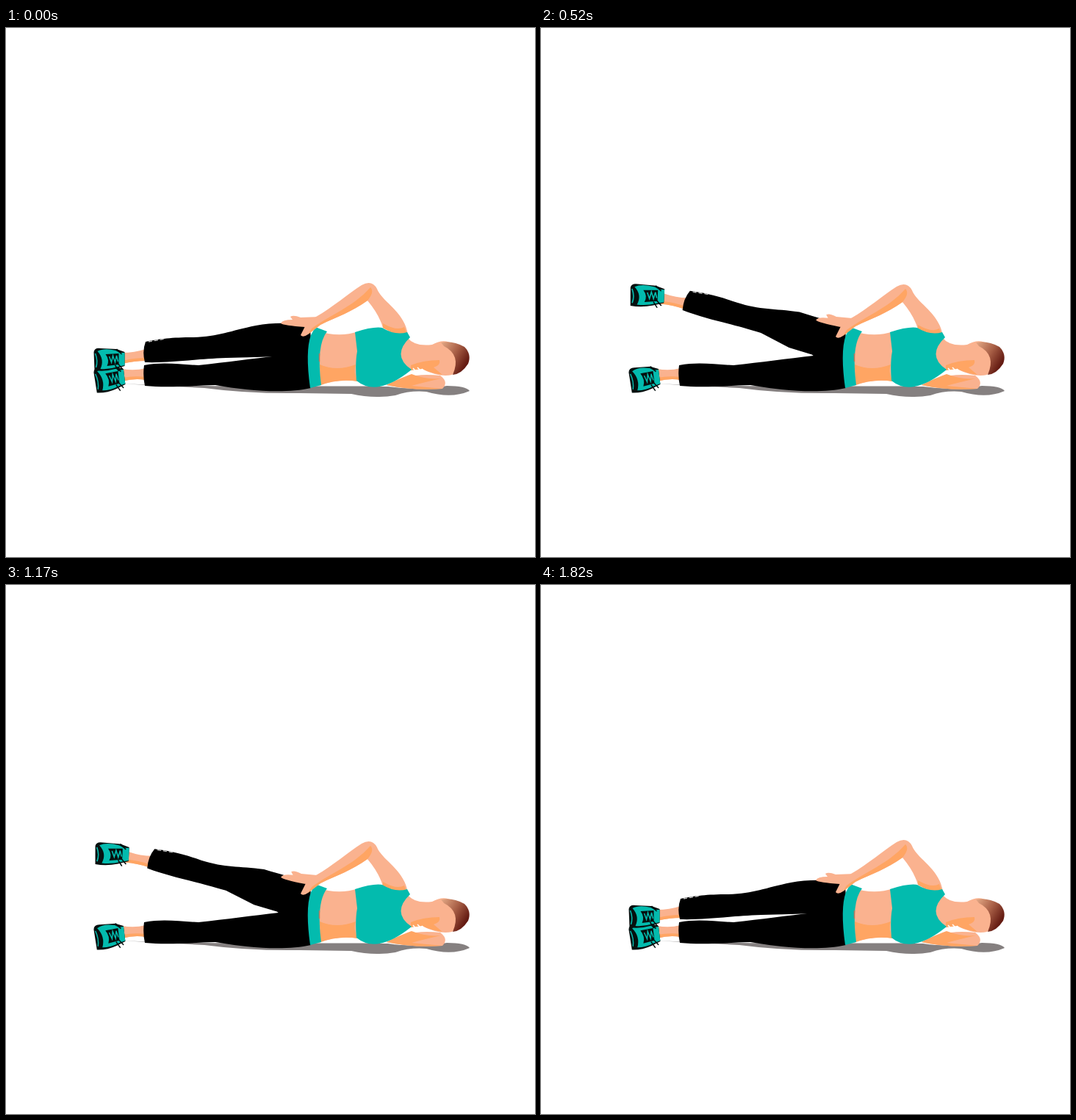
An HTML page that plays this animation: 720x720 px, repeating every 1950 ms.

```html
<!DOCTYPE html>
<html lang="en">
<head>
<meta charset="utf-8">
<title>Side leg raise</title>
<style>
html, body { margin: 0; width: 100%; height: 100%; overflow: hidden; background: #fff; }
svg { display: block; width: 100vw; height: 100vh; }
.skin { fill: #fab28f; }
.shade { fill: #ffa563; }
.teal { fill: #03bbae; }
.dark { fill: #06100f; }
.line { fill: none; stroke-width: 1.5; }
</style>
</head>
<body>
<svg viewBox="0 0 720 720">
  <defs>
    <linearGradient id="hair" x1="0" y1="0" x2="1" y2=".7">
      <stop offset="0" stop-color="#e6ab87"/><stop offset=".5" stop-color="#a75e45"/><stop offset=".9" stop-color="#651c13"/>
    </linearGradient>
    <g id="boot">
      <path class="dark" d="M-21 -10Q-20 -16 -12 -15L10 -14L21 -10V9L8 13Q-6 17 -20 15Z"/>
      <path class="teal" d="M-16 -11Q-7 -16 9 -12L14 -9L21 -9V8L12 10Q0 14 -12 13Q-6 0 -16 -11Z"/>
      <path class="dark" d="M-5 -7L13 -8V7L-3 9Q1 1 -5 -7Z"/>
      <path class="line" stroke="#03bbae" d="M-19 -8Q-15 2 -18 11M0 -4L3 4L5 -5L8 4L10 -5L12 3"/>
      <path class="line" stroke="#06100f" d="M10 -14L17 -7M8 8L13 16M12 6L18 13"/>
    </g>
  </defs>

  <path fill="#858080" d="M156 484C300 490 460 486 520 488Q560 494 600 487Q626 487 631 494Q606 505 572 495Q550 493 530 500Q500 505 470 498L400 497Q330 498 270 490Z"/>

  <g id="restingLeg">
    <path class="skin" d="M158 464Q175 467 190 463V479Q175 476 158 481Z"/>
    <path class="shade" d="M158 476Q175 473 190 475V479Q175 476 158 481Z"/>
    <use href="#boot" transform="translate(141 477.5) rotate(-7) scale(.97 1.12)"/>
    <path d="M188 459C215 454 235 458 262 459C300 455 335 450 371 446L395 430L414 410Q418 450 415 490C380 498 330 494 285 486C250 487 220 490 189 487Q186 473 188 459Z"/>
  </g>

  <g id="raisedLeg">
    <path class="skin" data-bend d="M158 442Q175 442 190 437V453Q175 453 158 457Z"/>
    <path class="shade" data-bend d="M158 453Q175 449 190 449V453Q175 453 158 457Z"/>
    <use href="#boot" id="foot"/>
    <path data-bend d="M414 407C390 400 365 401 340 405C305 412 290 420 255 421C225 421 210 423 190 427Q185 440 189 455C225 456 250 451 300 449L340 448L370 447L400 468L414 440Z"/>
    <path class="line" data-bend stroke="#bbb" stroke-dasharray="5 3" d="M194 427L216 423"/>
  </g>

  <g id="torso">
    <path class="skin" d="M424 412Q452 422 480 413V481Q452 477 426 487Z"/>
    <path class="shade" d="M427 458Q450 468 476 458Q472 468 479 481Q452 477 428 486Z"/>
    <path class="teal" d="M421 407L437 413Q422 432 429 486L414 490Q407 440 415 418Z"/>
    <path class="line" stroke="#b07a60" d="M426.5 443V454"/>
  </g>

  <g id="head">
    <path class="skin" d="M518 486Q548 468 591 473Q603 482 594 491Q555 494 518 486Z"/>
    <path class="shade" d="M518 486Q540 475 552 471Q572 479 592 477Q570 482 552 487L594 491Q555 494 518 486Z"/>
    <path class="skin" d="M546 421Q556 434 580 431Q596 422 608 430L619 448Q618 464 607 472Q590 476 566 464L530 466V440Z"/>
    <path class="shade" d="M551 459Q568 452 590 452Q592 459 582 462L594 472Q580 470 566 464L551 466Z"/>
    <path class="line" stroke="#fff" d="M554 463L561 471M560 462L568 470M566 464L574 470"/>
    <path fill="url(#hair)" d="M592 428Q608 425 624 434Q634 444 629 457Q620 471 608 472Q620 445 596 433Z"/>
  </g>

  <g id="arm">
    <path id="hand" class="skin" d="M428 393L401 394Q391 390 387 393L390 397Q376 397 374 402Q378 405 407 407L424 406Z"/>
    <path class="skin" d="M422 393C445 380 465 362 484 350Q498 342 505 355C512 373 542 385 547 417H530L513 408Q508 390 492 371C470 387 450 393 428 404L411 417Q404 422 401 418L408 404Z"/>
    <path class="shade" d="M416 409C442 390 472 380 496 353Q502 359 492 371C470 387 450 393 428 404L411 417Z"/>
    <path class="shade" d="M513 402Q532 413 542 407L546 417H530L513 408Z"/>
  </g>
  <path class="teal" d="M475 414Q500 406 512 408Q530 419 546 414L550 421Q524 446 552 465Q505 503 477 480Q475 456 478 440Z"/>
</svg>
<script>
const STEP = 130, STEPS = 15, TOP_STEP = 7;
const MAX_ANGLE = 28.6 * Math.PI / 180;
const HIP = { x: 400, y: 430 };

const byId = id => document.getElementById(id);
const bent = [...document.querySelectorAll("[data-bend]")]
  .map(el => ({ el, rest: el.getAttribute("d").replace(/V([\d.]+)/g, "L190 $1") }));

// Turns a point about the hip; the turn fades out close to the joint.
function bend(x, y, angle) {
  const dx = x - HIP.x, dy = y - HIP.y;
  const reach = Math.min(1, Math.max(0, (-dx - 0.7 * dy) / 75));
  const c = Math.cos(angle * reach), s = Math.sin(angle * reach);
  return [HIP.x + dx * c - dy * s, HIP.y + dx * s + dy * c];
}

// Quick rise, then a softer landing
function liftAt(step) {
  const wave = Math.sin(Math.PI * step / (2 * TOP_STEP)) ** 2;
  return wave ** (step <= TOP_STEP ? 0.8 : 2);
}

function pose(lift) {
  const angle = MAX_ANGLE * lift;
  for (const { el, rest } of bent) {
    el.setAttribute("d", rest.replace(/([\d.]+) ([\d.]+)/g,
      (_, x, y) => bend(+x, +y, angle).map(n => n.toFixed(2)).join(" ")));
  }
  const [x, y] = bend(140.5, 451, angle), turn = lift * lift;
  byId("foot").setAttribute("transform",
    `translate(${x - 8 * turn} ${y}) rotate(${6 * turn}) scale(${1 + 0.23 * turn} 1)`);
  byId("arm").setAttribute("transform", `translate(0 ${3 * lift})`);
  byId("hand").setAttribute("transform", `rotate(${11 * lift} 424 400)`);
}

function draw() {
  pose(liftAt(Math.floor(performance.now() / STEP) % STEPS));
  requestAnimationFrame(draw);
}
draw();
</script>
</body>
</html>
```
